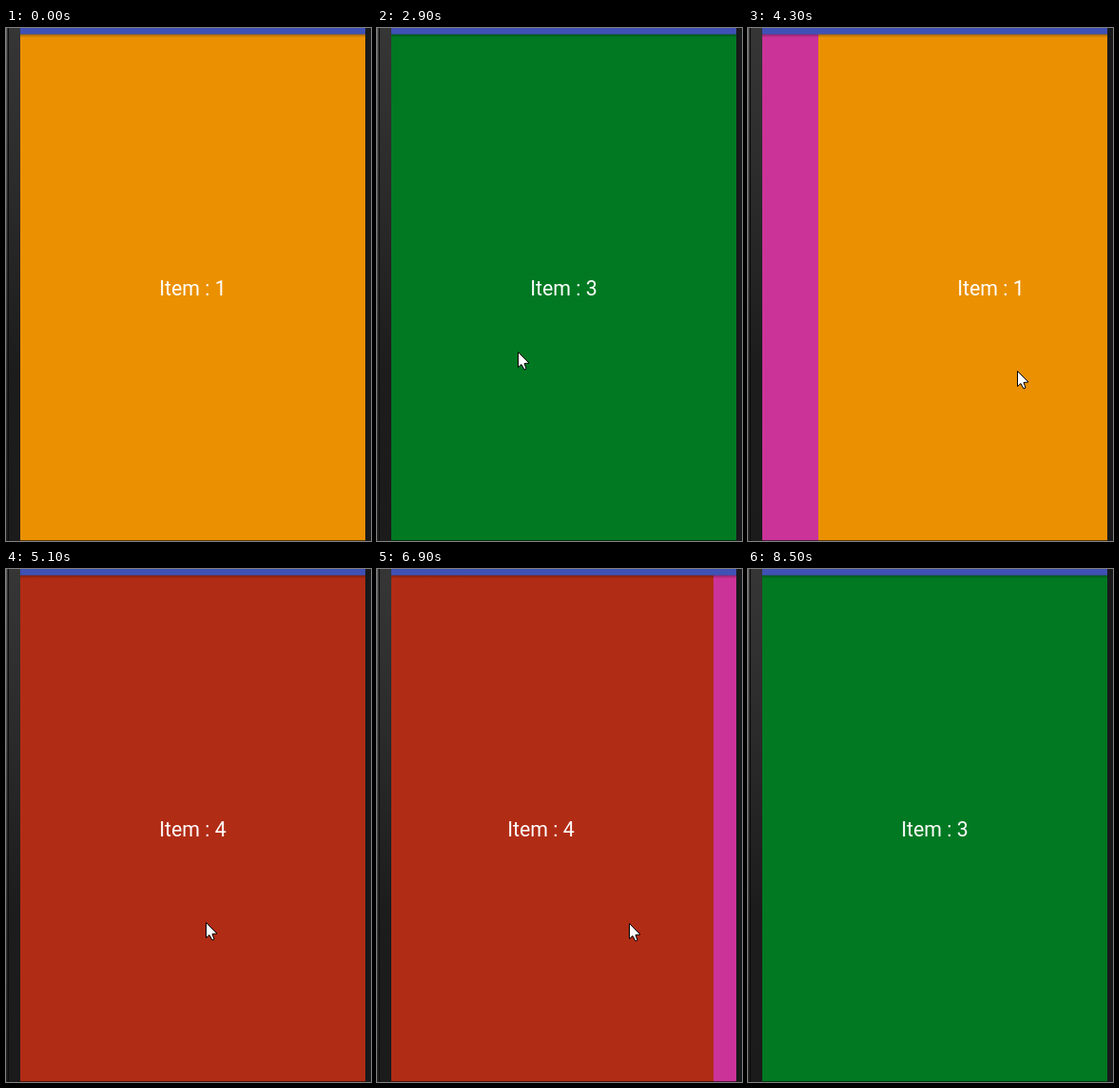
Recreate the animation shown at these times as an HTML page with a canvas. Size 384 px wide and 539 px high, loop 8.9 s.

```html
<!DOCTYPE html>
<html lang="en">
<head>
<meta charset="utf-8">
<title>Endless pager</title>
<style>
html, body { margin: 0; width: 100%; height: 100%; overflow: hidden; background: #111; }
canvas { display: block; }
</style>
</head>
<body>
<canvas id="stage" width="384" height="539"></canvas>
<script>
const ctx = document.getElementById('stage').getContext('2d');
const LOOP = 8900, STEP = 100;
const LEFT = 15, TOP = 6, WIDTH = 363, HEIGHT = 539;
const REACH = 144, SHARE = REACH / WIDTH;   // length of one drag
const COLORS = ['#eb9000', '#580091', '#007922', '#b12c15', '#cc3399'];

// Key points of the swiping: time, flick count, pointer home x, y
const KEYS = [
  [3200, 2, 148, 340],
  [4300, -0.163, 224, 360],
  [5100, -2, 210, 371],
  [6200, 1 + SHARE, 290, 357],
  [7600, 4.738, 288, 387],
  [8500, 7, 290, 392]
];

const clamp = u => Math.max(0, Math.min(1, u));
const easeOut = u => 1 - (1 - u) ** 3;
const autoScroll = (t, start, length) => easeOut(clamp((t - start) / length));

// Each flick drags the page by REACH, then the page settles while the pointer returns.
function flick(count, home, dir) {
  const n = Math.floor(count * dir), f = count * dir - n;
  const back = easeOut(clamp((f - SHARE) / (1 - SHARE)));
  const drag = Math.min(f, SHARE);
  return {
    page: dir * (n + drag + (1 - SHARE) * back),
    x: Math.round(home - dir * drag * WIDTH * (1 - back))
  };
}

function stateAt(t) {
  if (t <= KEYS[0][0]) {
    return {
      page: autoScroll(t, 0, 700) + autoScroll(t, 2400, 500),
      x: t < 1700 ? 149 : 148, y: 340, pointer: t >= 1600
    };
  }
  const i = KEYS.findIndex(key => key[0] > t);
  if (i < 0) return { page: KEYS.at(-1)[1], pointer: false };
  const a = KEYS[i - 1], b = KEYS[i];
  const u = (t - a[0]) / (b[0] - a[0]);
  const [count, home, y] = [1, 2, 3].map(n => a[n] + (b[n] - a[n]) * u);
  return { ...flick(count, home, Math.sign(b[1] - a[1])), y: Math.round(y), pointer: true };
}

function rect(color, x, y, w, h) {
  ctx.fillStyle = color;
  ctx.fillRect(x, y, w, h);
}

function gradient(y0, y1, ...colors) {
  const g = ctx.createLinearGradient(0, y0, 0, y1);
  colors.forEach((color, i) => g.addColorStop(i / (colors.length - 1), color));
  return g;
}

function drawPage(index, x) {
  const id = (index % 5 + 5) % 5;
  rect(COLORS[id], x, TOP, WIDTH, HEIGHT - TOP);
  ctx.fillStyle = '#fff';
  ctx.fillText('Item : ' + (id + 1), x + WIDTH / 2, 281);
}

function drawPages(page) {
  ctx.save();
  ctx.beginPath();
  ctx.rect(LEFT, TOP, WIDTH, HEIGHT - TOP);
  ctx.clip();
  ctx.font = '21.3px Roboto, sans-serif';
  ctx.textAlign = 'center';
  const first = Math.floor(page);
  const x = LEFT + Math.round((first - page) * WIDTH);
  drawPage(first, x);
  drawPage(first + 1, x + WIDTH);
  rect(gradient(TOP, TOP + 4, 'rgba(0,0,0,.35)', 'rgba(0,0,0,0)'), LEFT, TOP, WIDTH, 4);
  rect('rgba(0,0,0,.6)', LEFT, HEIGHT - 1, WIDTH, 1);
  ctx.restore();
}

function drawFrame() {
  rect(gradient(0, HEIGHT, '#363636', '#2a2a2a', '#1c1c1c', '#1b1b1b'), 0, 0, LEFT, HEIGHT);
  rect(gradient(0, HEIGHT, '#666', '#222'), 0, 0, 1, HEIGHT);
  rect('#0c0c0c', 2, 0, 1, HEIGHT);
  rect('#19191b', LEFT + WIDTH, 0, 6, HEIGHT);
  rect('#3f51b5', LEFT, 0, WIDTH, TOP + 0.6);
}

function drawPointer(x, y) {
  ctx.save();
  ctx.translate(x + 0.5, y + 0.5);
  ctx.beginPath();
  [[0, 0], [0, 16], [3.5, 13], [6.5, 18.5], [8.5, 17.5], [6.5, 12], [11.5, 11.5]]
    .forEach(p => ctx.lineTo(...p));
  ctx.closePath();
  ctx.fillStyle = '#fff';
  ctx.fill();
  ctx.strokeStyle = '#000';
  ctx.stroke();
  ctx.restore();
}

function draw() {
  const t = Math.floor(performance.now() % LOOP / STEP) * STEP;
  const s = stateAt(t);
  drawPages(s.page);
  drawFrame();
  if (s.pointer) drawPointer(s.x, s.y);
  requestAnimationFrame(draw);
}
draw();
</script>
</body>
</html>
```
